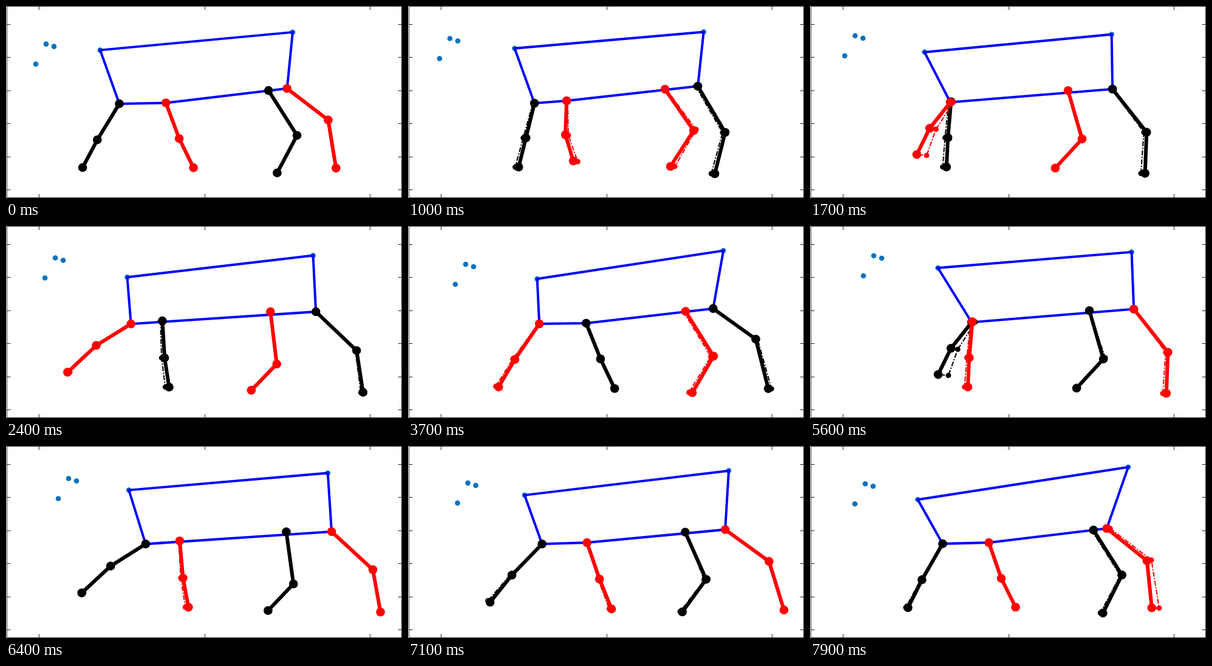
Recreate the animation shown at these times as an HTML page with a canvas. Size 652x316 px, loop 8000 ms.

```html
<!DOCTYPE html>
<html lang="en">
<head>
<meta charset="utf-8">
<title>Walking gait</title>
<style>
  html, body { margin: 0; width: 100%; height: 100%; overflow: hidden; background: #fff; }
  canvas { display: block; }
</style>
</head>
<body>
<canvas id="stage" width="652" height="316"></canvas>
<script>
const STEP = 100, STEPS = 80;
const STRIDE = 78, HALF = STRIDE / 2, FIRST_POSE = 10;
const ctx = document.getElementById('stage').getContext('2d');

// One stride as six evenly spaced poses: hip x, y, then knee and foot from the hip.
const foreStride = [
  [205, 160, -14, 57,  -26, 105],
  [239, 156,   2, 61,    8, 109],
  [261, 160,  24, 59,   47, 108],
  [258, 156,  -2, 56,   11,  99],
  [192, 161, -56, 35, -102,  79],
  [184, 161, -42, 58,  -70, 103]
];
const hindStride = [
  [474, 132, 45, 76,  28, 144],
  [494, 141, 66, 65,  75, 133],
  [474, 136, 71, 50,  94, 132],
  [420, 137, 47, 68,   9, 127],
  [419, 141, 10, 86, -32, 129],
  [423, 141, 45, 74,   9, 133]
];

// The two legs of a pair walk half a stride apart.
const legs = [
  { color: '#000', stride: foreStride, lead: 0 },
  { color: '#f00', stride: foreStride, lead: HALF },
  { color: '#000', stride: hindStride, lead: 0 },
  { color: '#f00', stride: hindStride, lead: HALF }
];

const arc = (t, span) => Math.sin(Math.PI * t / span);
const wave = (t, period, peak) => Math.cos(2 * Math.PI * (t - peak) / period);
const drift = t => 44 * arc(t, 115) ** 2;

// Smooth closed curve through evenly spaced rows; s counts rows.
function cycle(rows, s) {
  const n = rows.length, i = Math.floor(s), u = s - i;
  const [a, b, c, d] = [-1, 0, 1, 2].map(k => rows[(i + k + n) % n]);
  return b.map((v, j) => v + u / 2 * (c[j] - a[j] +
    u * (2 * a[j] - 5 * v + 4 * c[j] - d[j] +
    u * (3 * (v - c[j]) + d[j] - a[j]))));
}

function legPose({ stride, lead }, t) {
  const phase = (t + lead - FIRST_POSE + STRIDE) % STRIDE / STRIDE;
  const [hx, hy, kx, ky, fx, fy] = cycle(stride, phase * stride.length);
  const x = hx + drift(t);
  return [[x, hy], [x + kx, hy + ky], [x + fx, hy + fy]];
}

function headPose(t) {
  const x = 49 + 39 * arc(t, 112) ** 2;
  const y = 89 + 7 * wave(t, HALF, 37);
  return [[x, y], [x + 17, y - 33], [x + 30, y - 29]];
}

function backPose(t) {
  return [
    [155 + 60 * arc(t, 90), 79 + 10 * wave(t, 50, 32)],
    [472 + 58 * arc(t, 122), 46.5 - 0.1 * t + 4.5 * wave(t, HALF, 24)]
  ];
}

function convexHull(points) {
  const sorted = [...points].sort((p, q) => p[0] - q[0] || p[1] - q[1]);
  const half = list => {
    const out = [];
    for (const p of list) {
      while (out.length > 1) {
        const [o, q] = out.slice(-2);
        const cross = (q[0] - o[0]) * (p[1] - o[1]) - (q[1] - o[1]) * (p[0] - o[0]);
        if (cross > 0) break;
        out.pop();
      }
      out.push(p);
    }
    return out.slice(0, -1);
  };
  return [...half(sorted), ...half(sorted.reverse())];
}

function line(points, color, width, dash = [], closed = false) {
  ctx.strokeStyle = color;
  ctx.lineWidth = width;
  ctx.setLineDash(dash);
  ctx.beginPath();
  points.forEach(p => ctx.lineTo(...p));
  if (closed) ctx.closePath();
  ctx.stroke();
}

function dots(points, color, radius) {
  ctx.fillStyle = color;
  for (const [x, y] of points) {
    ctx.beginPath();
    ctx.arc(x, y, radius, 0, 2 * Math.PI);
    ctx.fill();
  }
}

function drawAxes() {
  const ink = '#262626', size = 6;
  const left = 1.5, right = 651.5, top = 0.5, bottom = 315.5;
  line([[left, top], [right, top], [right, bottom], [left, bottom]], ink, 1, [], true);
  for (const x of [54.5, 327.5, 599.5]) {
    line([[x, top], [x, top + size]], ink, 1);
    line([[x, bottom], [x, bottom - size]], ink, 1);
  }
  for (let i = 0; i < 6; i++) {
    const y = Math.floor(30.5 + 54.4 * i) + 0.5;
    line([[left, y], [left + size, y]], ink, 1);
    line([[right, y], [right - size, y]], ink, 1);
  }
}

function drawLeg(leg, step) {
  const { color } = leg, joints = legPose(leg, step);
  if (step > 0) {
    // Trail of the previous step, tied to the present foot.
    const past = legPose(leg, step - 1);
    line([...past, joints[2]], color, 2, [8, 2.5, 2, 2.5]);
    dots(past, color, 4.4);
  }
  line(joints, color, 6);
  dots(joints, color, 7.3);
}

function draw(step) {
  ctx.fillStyle = '#fff';
  ctx.fillRect(0, 0, 652, 316);
  drawAxes();

  const back = backPose(step);
  const hips = legs.map(leg => legPose(leg, step)[0]);
  dots([...headPose(step), ...back], '#0072bd', 4.3);
  line(convexHull([...back, ...hips]), '#00f', 4, [], true);
  legs.forEach(leg => drawLeg(leg, step));
}

const start = performance.now();
let shown = -1;
function tick() {
  const step = Math.floor((performance.now() - start) / STEP) % STEPS;
  if (step !== shown) draw(shown = step);
  requestAnimationFrame(tick);
}
tick();
</script>
</body>
</html>
```
